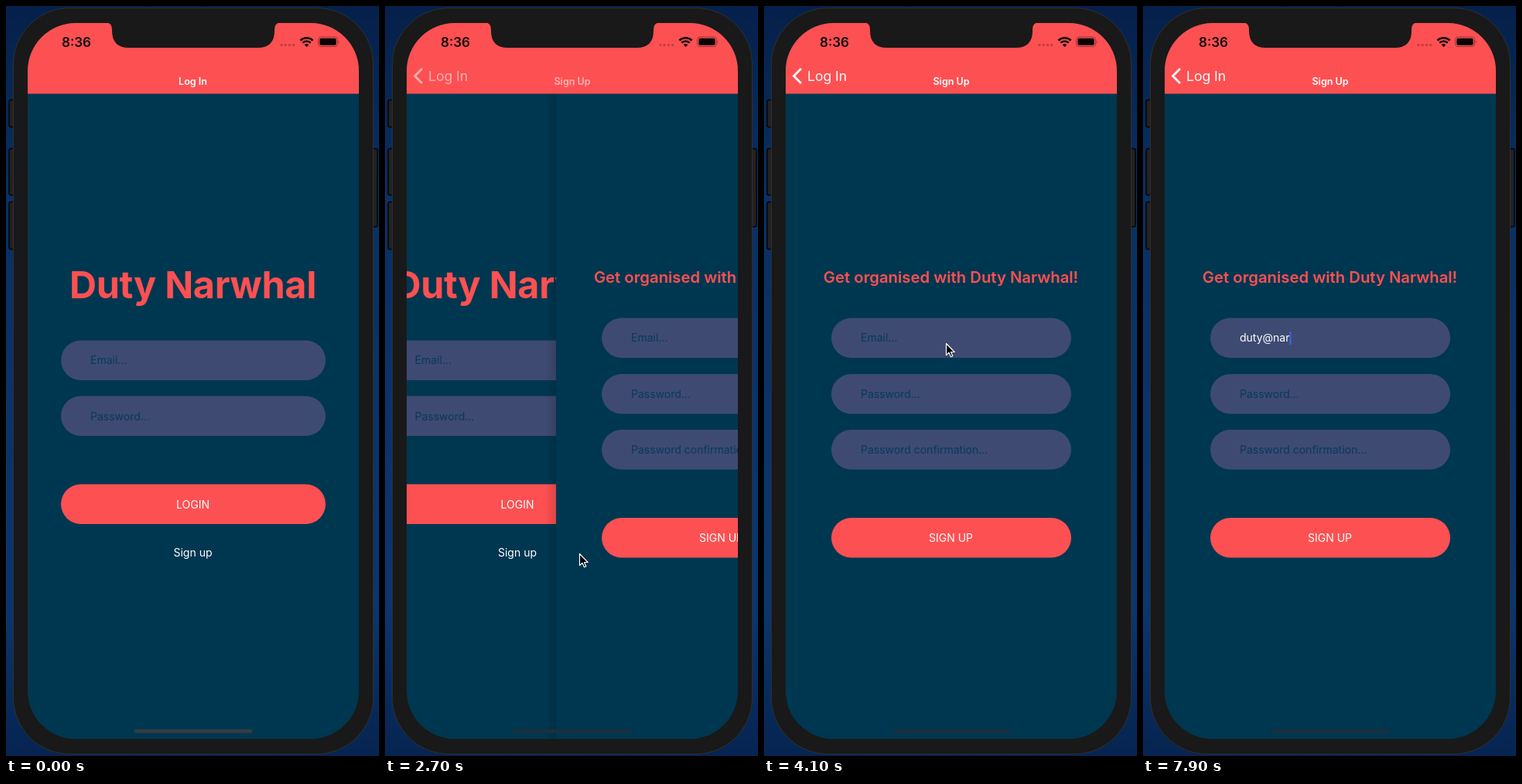
An HTML page that plays this animation: 482x970 px, repeating every 8000 ms.

```html
<!DOCTYPE html>
<html lang="en">
<head>
<meta charset="utf-8">
<title>Sign up</title>
<style>
  html, body { margin: 0; width: 100%; height: 100%; overflow: hidden; background: #06295a; }
  svg { display: block; }
  text { font: 14px Inter, sans-serif; fill: #fff; white-space: pre; }
  .mid { text-anchor: middle; }
  .field { fill: #3e4a72; }
  .button, .bar { fill: #fd5052; }
  .hint { fill: #083a5b; }
  .title { font-size: 48.5px; font-weight: 700; fill: #fd5052; letter-spacing: -.3px; }
  .lead { font-size: 20.3px; font-weight: 600; fill: #fd5052; }
  .head { font-size: 12.5px; font-weight: 600; }
  .back { font-size: 17.5px; }
  .clock { font-size: 17px; font-weight: 600; fill: #14090a; }
  .caret { fill: #3f63e6; }
  .page { fill: #003750; }
</style>
</head>
<body>
<svg width="482" height="970" viewBox="0 0 482 970">
  <defs>
    <linearGradient id="desk" x2="0" y2="1">
      <stop offset="0" stop-color="#05204a"/>
      <stop offset=".25" stop-color="#083064"/>
      <stop offset=".8" stop-color="#0a3670"/>
      <stop offset="1" stop-color="#062450"/>
    </linearGradient>
    <linearGradient id="edge">
      <stop offset="0" stop-opacity="0"/>
      <stop offset="1" stop-opacity=".13"/>
    </linearGradient>
    <clipPath id="screen"><rect x="28" y="22" width="428" height="926" rx="62"/></clipPath>
  </defs>

  <rect width="482" height="970" fill="url(#desk)"/>
  <g fill="#222" stroke="#050505" stroke-width="1.5">
    <rect x="4" y="121.500" width="9" height="35" rx="2"/>
    <rect x="4" y="184.500" width="9" height="60" rx="2"/>
    <rect x="4" y="253.500" width="9" height="61" rx="2"/>
    <rect x="471" y="184.500" width="9" height="101" rx="2"/>
  </g>
  <rect x="9.500" y="2.500" width="465" height="965" rx="73" fill="#191919" stroke="#303030"/>

  <g clip-path="url(#screen)">
    <g id="login">
      <rect class="page" x="28" y="22" width="428" height="926"/>
      <text class="title mid" x="241.500" y="378">Duty Narwhal</text>
      <rect class="field" x="71" y="432.500" width="342" height="51.500" rx="25.750"/>
      <rect class="field" x="71" y="504.500" width="342" height="51.500" rx="25.750"/>
      <text class="hint" x="109" y="463">Email...</text>
      <text class="hint" x="109" y="535.500">Password...</text>
      <rect id="loginCaret" class="caret" x="109" y="450" width="2" height="17"/>
      <rect class="button" x="71" y="618.500" width="342" height="51.500" rx="25.750"/>
      <text class="mid" x="241.500" y="649.500">LOGIN</text>
      <text class="mid" x="241.500" y="711.500">Sign up</text>
    </g>
    <g id="signup">
      <rect x="14" y="113" width="14" height="835" fill="url(#edge)"/>
      <rect class="page" x="28" y="22" width="428" height="926"/>
      <text class="lead mid" x="241.500" y="357.500">Get organised with Duty Narwhal!</text>
      <rect class="field" x="87" y="403.500" width="310" height="51.500" rx="25.750"/>
      <rect class="field" x="87" y="476" width="310" height="51.500" rx="25.750"/>
      <rect class="field" x="87" y="548" width="310" height="51.500" rx="25.750"/>
      <text id="emailHint" class="hint" x="125" y="434">Email...</text>
      <text id="email" x="125" y="434"></text>
      <rect id="emailCaret" class="caret" y="421" width="2" height="17"/>
      <text class="hint" x="125" y="506.500">Password...</text>
      <text class="hint" x="125" y="578.500">Password confirmation...</text>
      <rect class="button" x="87" y="662" width="310" height="51.500" rx="25.750"/>
      <text class="mid" x="241.500" y="693">SIGN UP</text>
    </g>

    <rect class="bar" x="28" y="22" width="428" height="91.500"/>
    <text id="loginHead" class="head mid" x="241.500" y="101.500">Log In</text>
    <g id="signupHead">
      <text class="head mid" x="242" y="101.500">Sign Up</text>
      <path d="M48 81L38.500 90.500L48 100" fill="none" stroke="#fff" stroke-width="2.800"/>
      <text class="back" x="56" y="97">Log In</text>
    </g>

    <text class="clock" x="72" y="52.500">8:36</text>
    <g fill="#c73f41">
      <circle cx="356" cy="50.500" r="1.800"/><circle cx="361" cy="50.500" r="1.800"/>
      <circle cx="366.500" cy="50.500" r="1.800"/><circle cx="371.700" cy="50.500" r="1.800"/>
    </g>
    <path d="M380.400 44.500a11.500 11.500 0 0 1 16.200 0M383.300 47.700a7.200 7.200 0 0 1 10.400 0"
      fill="none" stroke="#14090a" stroke-width="2.500"/>
    <path d="M388.500 53l-2.700-2.800a3.800 3.800 0 0 1 5.400 0z" fill="#14090a"/>
    <rect x="403.500" y="40" width="25" height="12.500" rx="3.500" fill="none" stroke="#9c3234"/>
    <rect x="405.300" y="41.800" width="21.400" height="8.900" rx="2" fill="#080304"/>
    <path d="M429.700 44.200q2 2 0 4z" fill="#9c3234"/>
    <rect id="home" x="166" y="935.500" width="152.500" height="4.500" rx="2.250"/>
  </g>
  <path d="M129 21q8 1 8 9v2q0 22 22 22h166q22 0 22-22v-2q0-8 8-9z" fill="#191919"/>

  <path id="cursor" d="M0 0V15L3.500 11.800L6 17.200L8.300 16.200L6 11H10.700Z" fill="#000" stroke="#fff"
    stroke-width="1.200" stroke-linejoin="round"/>
</svg>
<script>
const $ = id => document.getElementById(id);
const clamp = v => Math.max(0, Math.min(1, v));
const mix = (a, b, k) => a + (b - a) * k;

const LOOP = 8000, PUSH = 2586, FOCUS = 4400, WIDTH = 428;
const address = 'duty@nar';
const keys = [6180, 6430, 6680, 6900, 7200, 7450, 7640, 7820];
// time, x, y
const route = [[1300, 262, 985], [1900, 268.5, 783.5], [2400, 251.5, 708.5],
               [3300, 251.5, 708.5], [4050, 235.5, 436.5], [LOOP, 235.5, 436.5]];

// Critically damped spring from 0 to 1
function spring(ms) {
  const x = Math.max(0, ms) * 0.016;
  return 1 - Math.exp(-x) * (1 + x);
}

// Soft caret blink, fully on at ms = 0
const blink = ms => clamp(.5 + 3 * Math.sin(2 * Math.PI * (ms + 100) / 1000));

function moveCursor(t) {
  const shown = t >= route[0][0] && t < keys[0];
  $('cursor').setAttribute('visibility', shown ? 'visible' : 'hidden');
  if (!shown) return;
  const i = route.findIndex(p => p[0] > t);
  const [t0, x0, y0] = route[i - 1], [t1, x1, y1] = route[i];
  const k = (t - t0) / (t1 - t0), e = k * k * (3 - 2 * k);
  $('cursor').setAttribute('transform', `translate(${mix(x0, x1, e)} ${mix(y0, y1, e)})`);
}

function draw(t) {
  const p = spring(t - PUSH);
  $('login').setAttribute('transform', `translate(${-.3 * WIDTH * p} 0)`);
  $('signup').setAttribute('transform', `translate(${WIDTH * (1 - p)} 0)`);
  $('signup').setAttribute('visibility', p ? 'visible' : 'hidden');
  $('loginHead').setAttribute('opacity', 1 - clamp(p * 1.7));
  $('signupHead').setAttribute('opacity', p);
  $('home').setAttribute('fill', p > .2 ? '#1d2f3d' : '#393c40');
  $('loginCaret').setAttribute('opacity', t < PUSH ? blink(t - 1500) : 0);

  const typed = keys.filter(k => k <= t);
  $('email').textContent = address.slice(0, typed.length);
  $('emailHint').setAttribute('visibility', typed.length ? 'hidden' : 'inherit');
  const width = typed.length ? $('email').getComputedTextLength() : 0;
  $('emailCaret').setAttribute('x', 125 + width);
  const last = typed.length ? typed[typed.length - 1] : FOCUS;
  $('emailCaret').setAttribute('opacity', t < FOCUS ? 0 : blink(t - last));

  moveCursor(t);
}

function tick() {
  draw(performance.now() % LOOP);
  requestAnimationFrame(tick);
}
tick();
</script>
</body>
</html>
```
